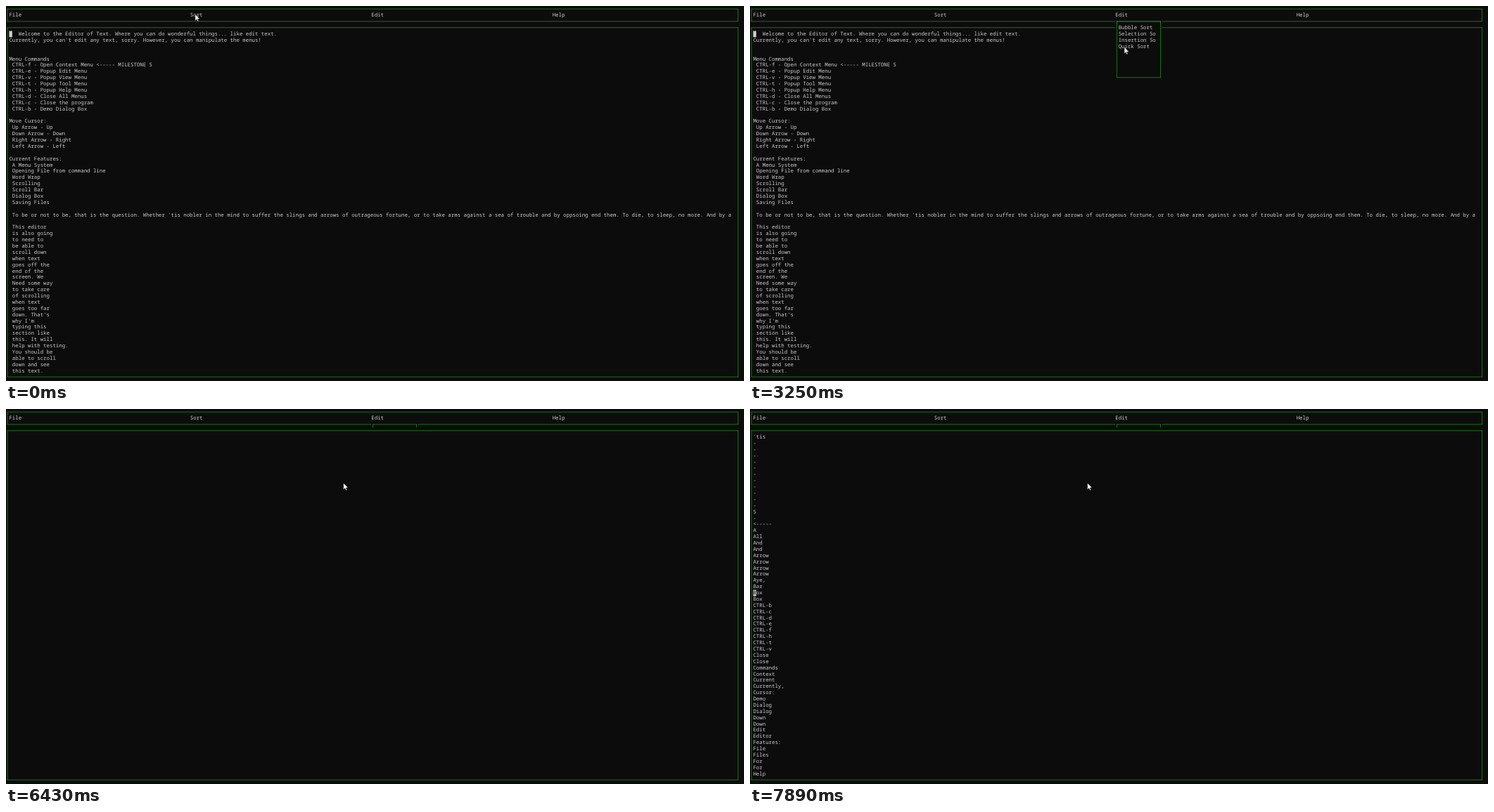
These frames come from a looping animation (1049 px wide and 534 px high, 8000 ms). An HTML page:

```html
<!DOCTYPE html>
<html lang="en">
<head>
<meta charset="utf-8">
<title>Text editor</title>
<style>
  html, body { margin: 0; width: 100%; height: 100%; overflow: hidden; background: #0c0c0c; }
  svg { display: block; width: 1049px; height: 534px; }
  text {
    font: 7.397px "Noto Sans Mono", "DejaVu Sans Mono", monospace;
    fill: #ccc; white-space: pre; text-rendering: geometricPrecision;
  }
  .line { fill: #13a10e; }
  .bg { fill: #0c0c0c; }
</style>
</head>
<body>
<svg id="stage"></svg>
<script>
const LOOP = 8000, W = 4.438, H = 8.88, TOP = 4, THIN = 0.7;

const intro = `   Welcome to the Editor of Text. Where you can do wonderful things... like edit text.
Currently, you can't edit any text, sorry. However, you can manipulate the menus!


Menu Commands
 CTRL-f - Open Context Menu <----- MILESTONE 5
 CTRL-e - Popup Edit Menu
 CTRL-v - Popup View Menu
 CTRL-t - Popup Tool Menu
 CTRL-h - Popup Help Menu
 CTRL-d - Close All Menus
 CTRL-c - Close the program
 CTRL-b - Demo Dialog Box

Move Cursor:
 Up Arrow - Up
 Down Arrow - Down
 Right Arrow - Right
 Left Arrow - Left

Current Features:
 A Menu System
 Opening File from command line
 Word Wrap
 Scrolling
 Scroll Bar
 Dialog Box
 Saving Files

 To be or not to be, that is the question. Whether 'tis nobler in the mind to suffer the slings and arrows of outrageous fortune, or to take arms against a sea of trouble and by oppsoing end them. To die, to sleep, no more. And by a

 This editor
 is also going
 to need to
 be able to
 scroll down
 when text
 goes off the
 end of the
 screen. We
 Need some way
 to take care
 of scrolling
 when text
 goes too far
 down. That's
 why I'm
 typing this
 section like
 this. It will
 help with testing.
 You should be
 able to scroll
 down and see
 this text.`.split("\n");

const sorted = ("'tis - - - - - - - - - - - 5 - <----- A All And And Arrow Arrow Arrow Arrow Aye, Bar Box Box " +
  "CTRL-b CTRL-c CTRL-d CTRL-e CTRL-f CTRL-h CTRL-t CTRL-v Close Close Commands Context Current " +
  "Currently, Cursor: Demo Dialog Dialog Down Down Edit Editor Features: File Files For For Help").split(" ");

// [start, page, visible rows, cursor row]
const screens = [
  [0, intro, 55, 0], [1330, intro, 1], [1450, intro, 55, 0], [3970, sorted, 55, 0], [5720, sorted, 55, 1],
  [6150, sorted, 1], [6280, sorted, 55, 4], [6430, sorted, 0], [6550, sorted, 55, 9],
  [6700, sorted, 0], [6830, sorted, 1], [6950, sorted, 55, 16],
  [7090, sorted, 0], [7220, sorted, 1], [7340, sorted, 55, 24],
  [7770, sorted, 1], [7890, sorted, 55, 25]
];

// [start, x, y] of the mouse pointer tip
const moves = [
  [0, 268.9, 11.7], [930, 268.9, 12.4], [1080, 268.7, 13.2],
  [2320, 290, 13.8], [2440, 348.4, 15.3], [2590, 402.4, 19.8],
  [2740, 455, 27], [2860, 498, 38], [2990, 520, 47.3],
  [3130, 528.4, 54.3], [3250, 532.1, 58.6],
  [4680, 531.9, 62], [4810, 531.4, 66.5], [4950, 480.4, 105.5], [5100, 479.7, 105.5]
];

const stage = document.getElementById("stage");

function add(tag, attrs, parent = stage) {
  const el = document.createElementNS("http://www.w3.org/2000/svg", tag);
  for (const k in attrs) el.setAttribute(k, attrs[k]);
  return parent.appendChild(el);
}

function put(str, col, row, parent) {
  const el = add("text", { x: col * W, y: (row + 0.74) * H }, parent);
  el.textContent = str;
  return el;
}

const rect = (x, y, width, height, cls, parent) => add("rect", { x, y, width, height, class: cls }, parent);
const lineX = col => (col + 0.47) * W - THIN / 2;
const lineY = row => (row + 0.47) * H - THIN / 2;

function box(c1, r1, c2, r2, parent) {
  const x = lineX(c1), y = lineY(r1), w = lineX(c2) - x + THIN, h = lineY(r2) - y + THIN;
  rect(x, y, w, THIN, "line", parent);
  rect(x, y + h - THIN, w, THIN, "line", parent);
  rect(x, y, THIN, h, "line", parent);
  rect(x + w - THIN, y, THIN, h, "line", parent);
}

box(0, 0, 234, 2);
box(0, 3, 234, 59);
["File", "Sort", "Edit", "Help"].forEach((name, i) => put(name, 1 + 58 * i, 1));

const rows = intro.map((_, i) => put("", 1, TOP + i));

// The top corners of the menu stay behind after it closes.
const corners = add("g");
for (const [col, gap] of [[117, -2], [131, THIN]]) {
  rect(lineX(col) + gap, lineY(2) - 1, 2, 2.5, "bg", corners);
  rect(lineX(col), lineY(2), THIN, 3 * H - lineY(2), "line", corners);
}

const menu = add("g");
rect(117 * W, 3 * H, 15 * W, 8.5 * H, "bg", menu);
box(117, 2, 131, 11, menu);
["Bubble Sort", "Selection So", "Insertion So", "Quick Sort"].forEach((name, i) => put(name, 118, 3 + i, menu));

const caret = add("g");
add("rect", { x: W, y: TOP * H, width: W, height: H, fill: "#ccc" }, caret);
const caretChar = put("", 1, TOP, caret);
caretChar.style.fill = "#0c0c0c";

const pointer = add("path", {
  d: "M0 0V9.2L2.1 7.2 3.5 10.4 4.9 9.8 3.5 6.7H6.5Z",
  fill: "#fff", stroke: "#000", "stroke-width": 0.4
});

const at = (list, t) => list.findLast(item => item[0] <= t);
const show = (el, on) => el.setAttribute("visibility", on ? "visible" : "hidden");
let current;

function draw() {
  const t = performance.now() % LOOP;
  const screen = at(screens, t), [, x, y] = at(moves, t);
  if (screen !== current) {
    current = screen;
    const [, page, count, row] = screen;
    rows.forEach((el, i) => el.textContent = i < count ? page[i] : "");
    show(caret, row !== undefined);
    if (row !== undefined) {
      caret.setAttribute("transform", `translate(0 ${row * H})`);
      caretChar.textContent = page[row][0];
    }
  }
  show(corners, t >= 1330);
  show(menu, t >= 1330 && t < 3970);
  pointer.setAttribute("transform", `translate(${x} ${y})`);
  requestAnimationFrame(draw);
}
draw();
</script>
</body>
</html>
```
